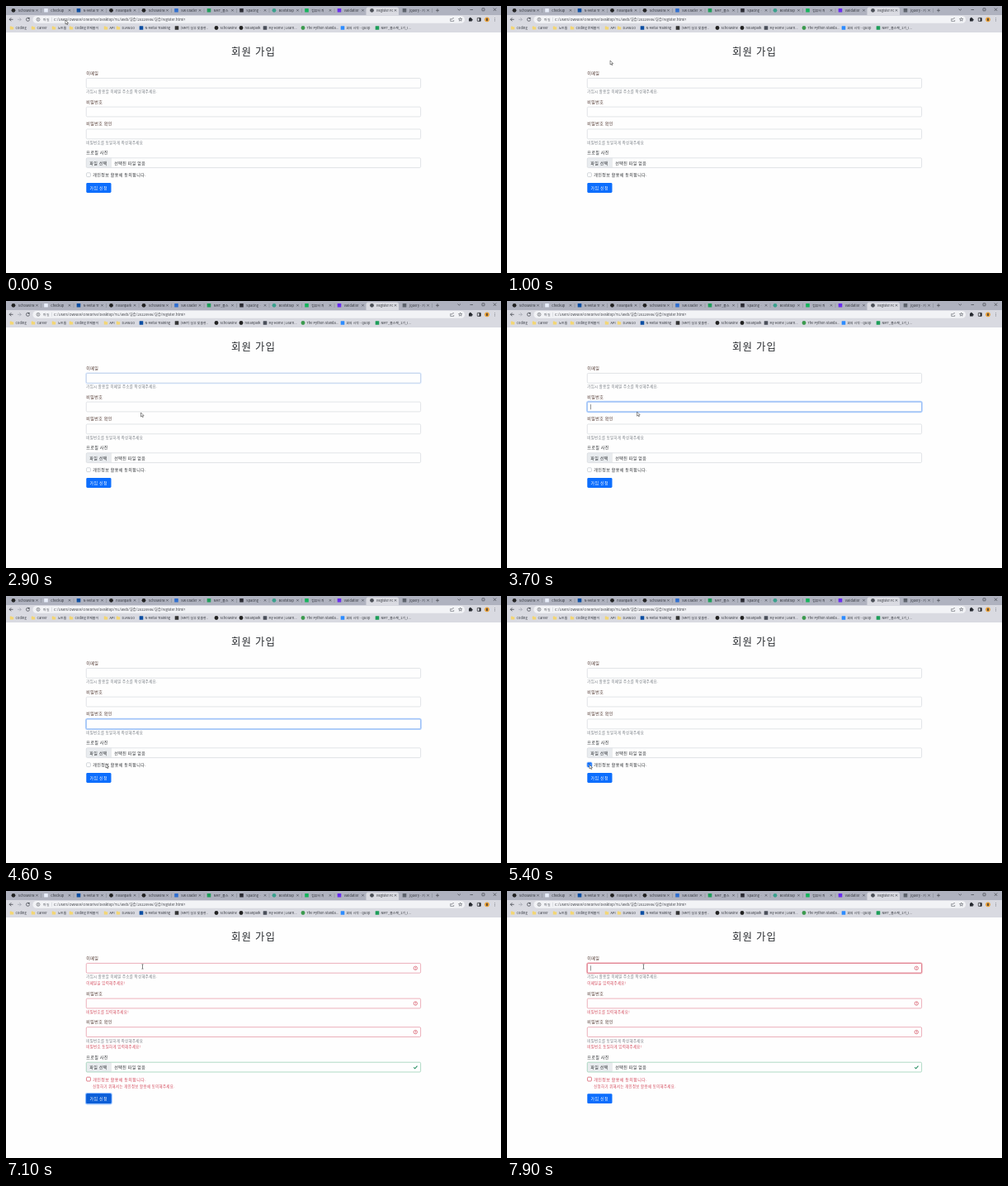
An HTML page with a canvas for the animation above (8 s loop, 600 by 323 pixels).

```html
<!DOCTYPE html>
<html lang="ko">
<head>
<meta charset="utf-8">
<title>회원 가입</title>
<style>
html, body { margin: 0; width: 100%; height: 100%; overflow: hidden; background: #fefefe; }
canvas { display: block; width: 600px; height: 323px; }
</style>
</head>
<body>
<canvas id="stage"></canvas>
<script>
const W = 600, H = 323, LOOP = 8000, STEP = 100;
const canvas = document.getElementById('stage');
const c = canvas.getContext('2d');
const dpr = window.devicePixelRatio || 1;
canvas.width = W * dpr;
canvas.height = H * dpr;

const FONT = '"Noto Sans CJK KR", "Noto Sans CJK", "Noto Sans", sans-serif';
const PAGE = '#fefefe', INK = '#2b2e32', BROWN = '#4d332c', MUTED = '#777d84', LINE = '#d5d9dd';
const RED = '#d3485a', RED_LINE = '#e48f9e', GREEN = '#2a8f63', GREEN_LINE = '#8fcaac';
const BLUE = '#0d6efd', YELLOW = '#f3d674';
const FRAME = '#afb2bf', BAR = '#d9dae1', OMNIBOX = '#f2f3f6';

const TABS = [
  ['Scholavine', '#222', 1], ['Checkup', '#e8eefb', 0], ['N-Metal Tr', '#0b4ea2', 0],
  ['nolanpark', '#222', 1], ['Scholavine', '#222', 1], ['SW Grader', '#2f6fd0', 0],
  ['NMT_풀스', '#1e9e5a', 0], ['Spacing ·', '#2b2b33', 0], ['Bootstrap', '#3aa08c', 1],
  ['컴퓨터 최', '#14b45c', 0], ['Validatior', '#6a2cf0', 0], ['Register Fo', '#4d5158', 1],
  ['jQuery - 기', '#5d636c', 0]
];
const MARKS = [
  [7, 'Coding'], [33, 'Career'], [58, '노트들'], [79, 'Coding 문제풀이'], [121, 'API'], [136, 'DJANGO'],
  [164, 'N-Metal Training', '#0b4ea2', 0], [207, '[NMT] 실무 맞춤형..', '#333', 0],
  [255, 'Scholavine', '#222', 1], [285, 'nolanpark', '#222', 1],
  [314, 'My Home | Learn...', '#4a4f5a', 0], [360, 'The Python Standa...', '#3c9a4e', 1],
  [408, '회의 시작 - Quop', '#2d8cff', 0], [450, 'NMT_풀스택_1기_I...', '#1e9e5a', 0]
];

// time, x, y
const PATH = [
  [0, 72, 17], [500, 72, 17], [900, 118, 62], [1400, 186, 100], [2100, 177, 106],
  [2400, 172, 94], [2600, 170, 95], [2900, 163.5, 135], [3300, 159, 129], [3600, 159, 129],
  [3950, 152, 155], [4200, 150, 156], [4600, 121, 203], [5200, 100, 204], [5900, 100, 204],
  [6400, 117, 219.5], [6700, 117, 219.5], [7100, 165.5, 91.5], [8000, 165.5, 91.5]
];

const clamp = v => Math.max(0, Math.min(1, v));
const pulse = (t, on, off) => clamp((t - on) / 150) - clamp((t - off) / 150);

// Loose tracking gives each Hangul syllable a full em
function text(s, x, y, size, color = INK, track = 0.08, weight = 400) {
  c.font = `${weight} ${size}px ${FONT}`;
  c.letterSpacing = `${size * track}px`;
  c.textBaseline = 'middle';
  c.fillStyle = color;
  c.fillText(s, x, y);
}

function rect(x, y, w, h, fill, r = 0) {
  c.fillStyle = fill;
  c.beginPath();
  c.roundRect(x, y, w, h, r);
  c.fill();
}

function frame(x, y, w, h, color, r, width = 0.7) {
  c.strokeStyle = color;
  c.lineWidth = width;
  c.beginPath();
  c.roundRect(x, y, w, h, r);
  c.stroke();
}

function dot(x, y, r, fill) {
  c.fillStyle = fill;
  c.beginPath();
  c.arc(x, y, r, 0, 7);
  c.fill();
}

function ring(x, y, r, color, width = 0.6, end = 6.3) {
  c.strokeStyle = color;
  c.lineWidth = width;
  c.beginPath();
  c.arc(x, y, r, 0, end);
  c.stroke();
}

function line(points, color, width = 0.6) {
  c.strokeStyle = color;
  c.lineWidth = width;
  c.beginPath();
  for (let i = 0; i < points.length; i += 2) c.lineTo(points[i], points[i + 1]);
  c.stroke();
}

function shape(points, x, y, fill, edge) {
  c.beginPath();
  for (let i = 0; i < points.length; i += 2) c.lineTo(x + points[i], y + points[i + 1]);
  c.closePath();
  c.fillStyle = fill;
  c.fill();
  c.strokeStyle = edge;
  c.lineWidth = 0.5;
  c.stroke();
}

function badge(x, y, color, round) {
  if (round) dot(x, y, 2.4, color);
  else rect(x - 2.3, y - 2.3, 4.6, 4.6, color, 0.5);
}

function cross(x, y, r, color, width) {
  line([x - r, y - r, x + r, y + r], color, width);
  line([x + r, y - r, x - r, y + r], color, width);
}

function drawTabs() {
  rect(0, 0, W, 11, FRAME);
  rect(436.5, 1.5, 39.5, 10, BAR, [2.5, 2.5, 0, 0]);
  TABS.forEach(([label, color, round], i) => {
    const x = 9 + i * 39.5;
    badge(x, 5.3, color, round);
    c.save();
    c.beginPath();
    c.rect(x + 5, 0, 20.5, 11);
    c.clip();
    text(label, x + 5.8, 5.3, 3.8, '#2a2d34', 0.02);
    c.restore();
    cross(x + 28.5, 5.3, 1.2, '#3c4048', 0.6);
    if (i < 10 || i === 12) rect(x + 33.3, 3, 0.5, 5, '#80858f');
  });
  line([521, 5.3, 525, 5.3], '#33363d');
  line([523, 3.3, 523, 7.3], '#33363d');
  line([547.5, 3.6, 549.3, 5.2, 551, 3.6], '#33363d');
  line([562.5, 4.5, 566, 4.5], '#33363d');
  frame(577, 2.8, 3, 3, '#33363d', 0.3, 0.6);
  cross(592.5, 4.3, 1.7, '#33363d', 0.6);
}

function drawToolbar() {
  rect(0, 11, W, 21, BAR);
  const ink = '#3f434b';
  line([14.5, 16.3, 10.3, 16.3].map(v => v === 16.3 ? v : v - 6), ink, 0.8);
  line([6.2, 14.3, 4.2, 16.3, 6.2, 18.3], ink, 0.8);
  line([14, 16.3, 18.2, 16.3], '#92969f');
  line([16.3, 14.3, 18.3, 16.3, 16.3, 18.3], '#92969f');
  ring(26.5, 16.3, 2, ink, 0.7, 5.3);
  rect(26.8, 14, 1.8, 1.6, ink);
  rect(32.5, 12, 523.5, 8.7, OMNIBOX, 4.3);
  ring(39, 16.3, 2, ink, 0.5);
  rect(38.7, 15.2, 0.6, 2.2, ink);
  text('파일', 45, 16.2, 3.9, '#50545c');
  rect(55, 13.8, 0.4, 5, '#b7bbc3');
  text('C:/Users/OWNER/OneDrive/Desktop/TIL/Web/실습/20220906/실습/register.html?', 58, 16.2, 4.1, '#32353b', 0.025);
  line([539.7, 15.5, 538.7, 15.5, 538.7, 18.4, 542.7, 18.4, 542.7, 17], ink, 0.5);
  line([540, 16.7, 541, 15, 543, 14.6], ink, 0.5);
  const star = [];
  for (let i = 0; i < 10; i++) {
    const a = i * Math.PI / 5 - Math.PI / 2, r = i % 2 ? 1 : 2.3;
    star.push(r * Math.cos(a), r * Math.sin(a));
  }
  shape(star, 550.7, 16.3, OMNIBOX, ink);
  rect(561, 14.8, 3.8, 3.8, '#24272d', 0.5);
  dot(562.8, 14.6, 0.9, '#24272d');
  dot(565, 16.7, 0.8, '#24272d');
  frame(571.3, 14.4, 4, 4, '#24272d', 0.4);
  rect(573.6, 14.4, 1.7, 4, '#24272d');
  dot(583, 16.3, 2.9, '#e9a23b');
  rect(582.1, 14.8, 1.8, 3.2, '#5a4630', 0.5);
  for (let i = -1; i < 2; i++) dot(592.5, 16.3 + i * 1.7, 0.45, ink);
}

function drawMarks() {
  for (const [x, label, color, round] of MARKS) {
    if (color) badge(x, 26.5, color, round);
    else {
      rect(x - 2.2, 24.6, 2.2, 1.5, YELLOW, 0.4);
      rect(x - 2.2, 25.2, 4.4, 3.4, YELLOW, 0.4);
    }
    text(label, x + 4.5, 26.5, 3.85, '#2d3037', 0.02);
  }
}

// Outline with a soft glow of the given strength
function field(x, y, w, h, r, base, focus, hot, glow) {
  frame(x, y, w, h, base, r);
  if (focus <= 0) return;
  c.globalAlpha = focus;
  frame(x - 0.6, y - 0.6, w + 1.2, h + 1.2, glow, r + 0.6, 1.3);
  frame(x, y, w, h, hot, r);
  c.globalAlpha = 1;
}

function input(y, focus, bad) {
  if (bad) {
    field(97.3, y, 405.3, 11.8, 1.3, RED_LINE, focus, '#dd7486', 'rgba(220,53,69,.25)');
    ring(496.3, y + 5.9, 2.2, RED, 0.65);
    rect(496, y + 4.5, 0.65, 1.7, RED);
    dot(496.3, y + 7.1, 0.4, RED);
  } else {
    field(97.3, y, 405.3, 11.8, 1.3, LINE, focus, '#86b7fe', 'rgba(13,110,253,.28)');
  }
}

function drawForm(t) {
  const bad = t >= 6700;
  const label = (s, y, color = BROWN) => text(s, 97.3, y, 5, color);
  const hint = (s, y) => text(s, 97.3, y, 4.43, MUTED);
  const warn = (s, y, x = 97.3) => bad && text(s, x, y, 4.43, RED);
  const at = (y, dy) => bad ? y + dy : y;

  text('회원 가입', 273.1, 55, 12.5, INK, 0.08, 300);

  label('이메일', 81);
  input(87.4, bad ? pulse(t, 7450, 9000) : pulse(t, 2450, 2800), bad);
  if (t >= 2500 && t < 2800 || t >= 7500) rect(101.3, 90.2, 0.5, 6.2, INK);
  hint('가입시 활용할 이메일 주소를 작성해주세요.', 103.4);
  warn('이메일을 입력해주세요!', 111.4);

  label('비밀번호', at(115.6, 8));
  input(at(122.1, 8), pulse(t, 3300, 4000), bad);
  if (t >= 3400 && t < 3900) rect(101.3, 125, 0.5, 6.2, INK);
  warn('비밀번호를 입력해주세요!', 146);

  label('비밀번호 확인', at(142.5, 15.6));
  input(at(149, 15.7), pulse(t, 4000, 5200), bad);
  if (t >= 4000 && t < 4500) rect(101.3, 152, 0.5, 6.2, INK);
  hint('비밀번호를 동일하게 작성해주세요', at(165.3, 15.6));
  warn('비밀번호 동일하게 입력해주세요!', 188.5);

  label('프로필 사진', at(177.5, 23.4), INK);
  const fy = at(183.8, 23.4);
  rect(97.3, fy, 30, 11.8, '#e9ecef', [1.3, 0, 0, 1.3]);
  frame(97.3, fy, 405.3, 11.8, bad ? GREEN_LINE : LINE, 1.3);
  rect(127.3, fy, 0.4, 11.8, LINE);
  text('파일 선택', 101.2, fy + 5.8, 5);
  text('선택된 파일 없음', 131.2, fy + 5.8, 5);
  if (bad) line([494.2, fy + 6.1, 495.7, fy + 7.6, 498.5, fy + 4.4], GREEN, 1.1);

  const cy = at(201.8, 23.4);
  const boxFocus = pulse(t, 5200, 6600);
  field(97.6, cy, 4.8, 4.8, 1, bad ? RED : '#bfc4ca', boxFocus, '#86b7fe', 'rgba(13,110,253,.3)');
  if (t >= 5300 && t < 5800) {
    rect(97.4, cy - 0.2, 5.2, 5.2, BLUE, 1);
    line([98.6, cy + 2.5, 99.6, cy + 3.5, 101.4, cy + 1.4], '#fff', 0.7);
  }
  text('개인정보 활용에 동의합니다.', 105.2, cy + 2.5, 5, bad ? RED : INK);
  warn('신청하기 위해서는 개인정보 활용에 동의해주세요.', 236, 105.2);

  const by = at(214, 31.2), press = pulse(t, 6450, 7450);
  c.globalAlpha = press;
  rect(96, by - 1.3, 32.8, 14.5, 'rgba(49,132,253,.5)', 2.4);
  c.globalAlpha = 1;
  rect(97.3, by, 30.2, 11.9, BLUE, 1.4);
  c.globalAlpha = press;
  rect(97.3, by, 30.2, 11.9, '#0b5ed7', 1.4);
  c.globalAlpha = 1;
  text('가입 신청', 101.4, by + 5.9, 5, '#fff');
}

function cursorAt(t) {
  let i = 0;
  while (i < PATH.length - 2 && t >= PATH[i + 1][0]) i++;
  const [t0, x0, y0] = PATH[i], [t1, x1, y1] = PATH[i + 1];
  const p = clamp((t - t0) / (t1 - t0)), k = p * p * (3 - 2 * p);
  return [x0 + (x1 - x0) * k, y0 + (y1 - y0) * k];
}

function drawCursor(t) {
  const [x, y] = cursorAt(t);
  const within = (a, b) => x > 97 && y > a && y < b;
  const beam = within(87, 107) || t < 6400 && (within(122, 134) || within(149, 161));
  const hand = t >= 6300 && t < 6800 && y > 213;
  if (beam) {
    line([x, y - 2.6, x, y + 2.6], '#333', 0.6);
    line([x - 1.1, y - 2.7, x + 1.1, y - 2.7], '#333', 0.5);
    line([x - 1.1, y + 2.7, x + 1.1, y + 2.7], '#333', 0.5);
  } else if (hand) {
    shape([-0.5, -1, 0.5, -1, 0.7, 1.3, 2.8, 1.9, 2.7, 4, 2, 5.4, -0.7, 5.4, -2.2, 3, -1.6, 2.5, -0.5, 3.3], x, y, '#fff', '#222');
  } else {
    shape([0, 0, 0, 5, 1.2, 4, 2, 5.7, 2.8, 5.3, 2, 3.7, 3.6, 3.6], x, y, '#fff', '#222');
  }
}

function draw(now) {
  const t = Math.floor(now % LOOP / STEP) * STEP;
  c.setTransform(dpr, 0, 0, dpr, 0, 0);
  rect(0, 0, W, H, PAGE);
  drawTabs();
  drawToolbar();
  drawMarks();
  drawForm(t);
  drawCursor(t);
}

let start;
function tick(now) {
  if (start === undefined) start = now;
  draw(now - start);
  requestAnimationFrame(tick);
}
draw(0);
requestAnimationFrame(tick);
</script>
</body>
</html>
```
